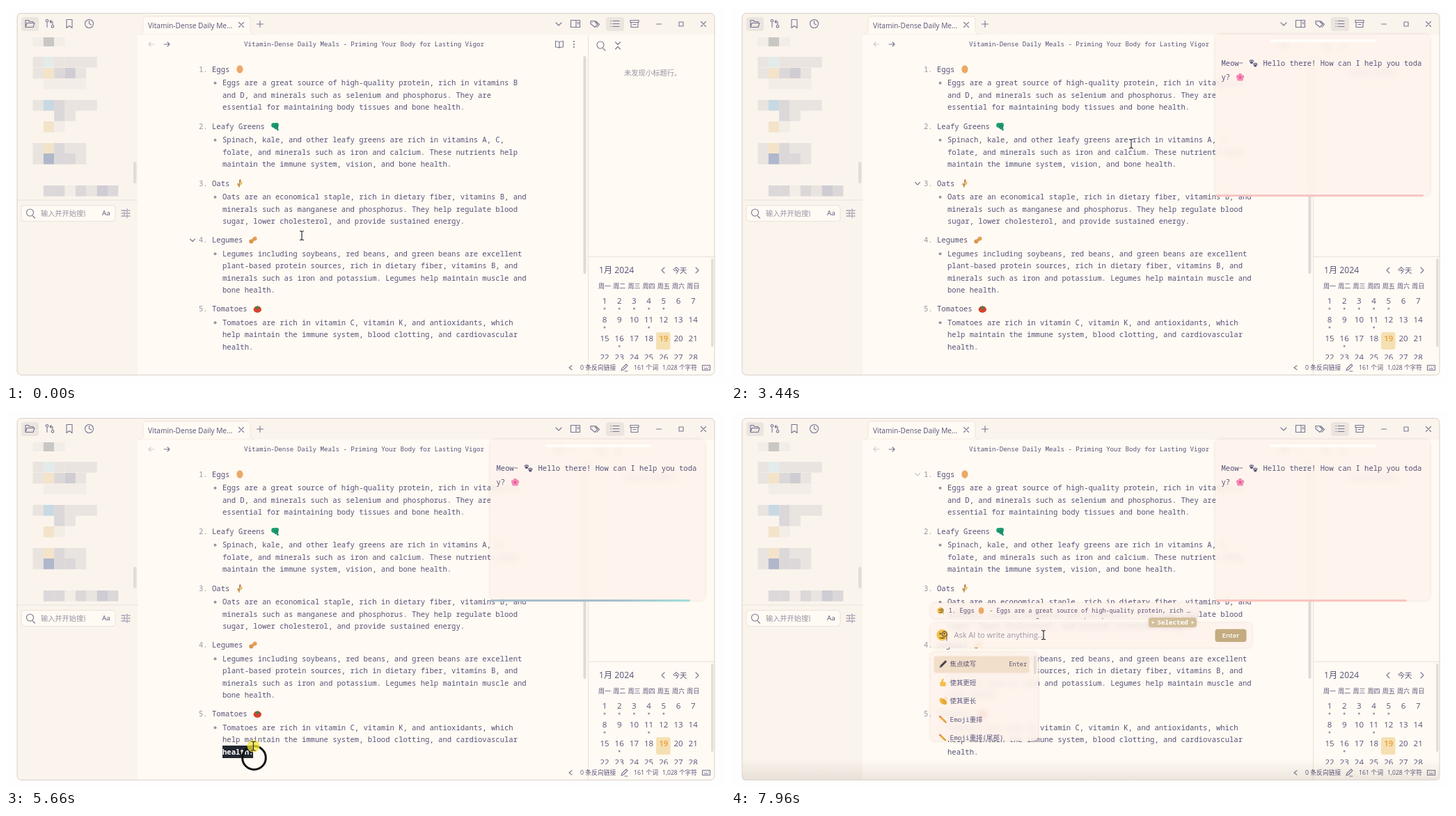
Write an HTML page that moves like this. It is 1033 px wide and 542 px high and loops after 8 s.

```html
<!DOCTYPE html>
<html lang="en">
<head>
<meta charset="utf-8">
<style>
html, body { margin: 0; width: 100%; height: 100%; overflow: hidden; background: #fefefe; }
#stage { position: relative; width: 1033px; height: 542px; overflow: hidden; }
svg { position: absolute; left: 0; top: 0; display: block; }
text { font: 10.55px 'Noto Sans Mono', 'Noto Sans CJK SC', monospace; fill: #575279; white-space: pre; }
.ui { font-family: 'Open Sans', 'Noto Sans CJK SC', sans-serif; }
.mid { text-anchor: middle; }
.muted { fill: #9893a5; }
.white { fill: #fff; }
.lit { fill: #fff; font-weight: 600; }
.today { fill: #ea9d34; font-weight: 600; }
.icon { fill: none; stroke: #797593; stroke-width: 1.1; stroke-linecap: round; stroke-linejoin: round; }
.glass { position: absolute; overflow: hidden; border-radius: 6px; background: rgba(254, 243, 236, .8);
  backdrop-filter: blur(5px); box-shadow: 0 0 4px rgba(150, 110, 90, .2); }
#tools { background: none; backdrop-filter: none; box-shadow: none; }
#badge { background: #d3bf9b; backdrop-filter: none; border-radius: 4px; }
#bar { position: absolute; left: 696px; top: 271px; height: 3px; border-radius: 2px; }
</style>
</head>
<body>
<div id="stage"></div>
<script>
const stage = document.getElementById('stage');
const $ = id => document.getElementById(id);
const CH = 6.33, LINE = 17.35;

// ---------- drawing helpers ----------
const text = (x, y, s, cls = '', size = 10.55, id = '') =>
  `<text id="${id}" x="${x}" y="${y + size * .35}" class="${cls}" style="font-size:${size}px">${s}</text>`;
const ui = (x, y, s, size, cls = '', id = '') => text(x, y, s, 'ui ' + cls, size, id);
const rect = (x, y, w, h, fill, r = 0, more = '') =>
  `<rect x="${x}" y="${y}" width="${w}" height="${h}" rx="${r}" fill="${fill}" ${more}/>`;
const dot = (x, y, r, fill) => `<circle cx="${x}" cy="${y}" r="${r}" fill="${fill}"/>`;
const oval = (x, y, rx, ry, fill, turn = 0) =>
  `<ellipse rx="${rx}" ry="${ry}" fill="${fill}" transform="translate(${x} ${y}) rotate(${turn})"/>`;
const path = (d, fill, more = '') => `<path d="${d}" fill="${fill}" ${more}/>`;
const stroke = (d, color, w) => path(d, 'none', `stroke="${color}" stroke-width="${w}" stroke-linecap="round"`);
const icon = (x, y, d) => `<path class="icon" transform="translate(${x} ${y})" d="${d}"/>`;

const paw = (x, y, c) => oval(x, y + 1.2, 2.2, 1.8, c) +
  [-2.4, -.9, .9, 2.4].map((dx, i) => oval(x + dx, y - (i % 3 ? 2 : .9), .8, 1.1, c)).join('');
const paws = c => paw(-2.6, -2, c) + paw(2.8, 2.6, c);
const face = dot(0, 0, 5.6, '#f5bf45') + dot(-2, -1.2, .8, '#5a3c20') + dot(2, -1.2, .8, '#5a3c20');
const art = {
  egg: oval(0, 0, 4.6, 5.7, '#eca865'),
  leaf: dot(-2, -1.5, 3.4, '#1d9c70') + dot(2, -2, 3.3, '#1d9c70') + dot(1.6, 1.2, 3, '#178763') + stroke('M1 1L4 5', '#1d9c70', 2.4),
  oats: stroke('M-1 5.5Q0 0 0-5', '#7b8a4e', 1) + oval(-2, 2, 1.3, 2.6, '#d98f4a', -25) + oval(2, 0, 1.3, 2.8, '#e9c067', 25) + oval(.4, -3.4, 1.2, 2.3, '#c9794a', 10),
  nut: dot(-2.6, 2, 3, '#d9914c') + dot(2.6, -2, 3, '#e6a35c') + oval(0, 0, 3.2, 2, '#df9a53', -40),
  tomato: oval(0, .8, 5.7, 4.7, '#d5432f') + path('M-4-3L-1-2.5L0-5.5L1-2.5L4-3L1.5-1L0 1L-1.5-1Z', '#2d8a4e'),
  paws: paws('#575279'),
  brownPaws: paws('#5a2a24'),
  flower: [0, 1, 2, 3, 4].map(i => dot(3.2 * Math.sin(i * 1.257), -3.2 * Math.cos(i * 1.257), 2.6, '#f58ab8')).join('') + dot(0, 0, 1.7, '#e0508c'),
  pen: stroke('M-3 3L4-4', '#44414f', 3.2) + stroke('M-5 5L-3 3', '#777', 1.2),
  thumb: rect(-4.5, -1, 9, 6.5, '#f3bd48', 2) + stroke('M-2 0L0-4.5', '#f3bd48', 2.8),
  clap: oval(-1, 0, 3.6, 5.4, '#f3bd48', -35) + oval(2, 1, 3.3, 4.8, '#e6a93c', -35) + stroke('M3-5L4-6M5-3L6-3.5', '#e6a93c', 1),
  pencil: stroke('M-4-4L3 3', '#eda73b', 3) + stroke('M3 3L5 5', '#b98a5a', 1.4) + dot(-4.5, -4.5, 1.4, '#e07a7a'),
  door: rect(-4, -6, 8, 12, '#9c4f36', .5) + rect(-2.4, -4.6, 4.8, 4, '#8a412b') + dot(2.3, 1, .8, '#e9c067'),
  think: face + stroke('M-2 2.2L2 1.4', '#5a3c20', .8) + stroke('M-3.4 5L1 3', '#e08e2b', 2.2),
  pin: stroke('M-1 1L-5 5', '#999', 1) + stroke('M-1.5 1.5L3-3', '#d9303e', 4) + stroke('M-4-1.5L1.5 4M1-5L5-1', '#d9303e', 2),
  chat: oval(0, -.6, 6.2, 4.8, '#a9cfe8') + path('M-4 2L-4.5 6L0 3.5Z', '#a9cfe8') + [-2.6, 0, 2.6].map(x => dot(x, -.6, .8, '#fff')).join(''),
  inbox: path('M-6 1H-3L-2 3H2L3 1H6V5.6H-6Z', '#6b6b70') + path('M-1.6-6H1.6V-2.5H4L0 1.6L-4-2.5H-1.6Z', '#2f9e62'),
  monocle: face + stroke('M-2 3H2', '#5a3c20', .9) + '<circle cx="2.2" cy="-1" r="2.4" fill="none" stroke="#555" stroke-width=".9"/>' + stroke('M4.4 0V5.5', '#666', .7),
};
const emoji = (name, x, y, s = 1) => `<g transform="translate(${x} ${y}) scale(${s})">${art[name]}</g>`;

// ---------- document ----------
const items = [
  ['Eggs', 'egg', 91, ['Eggs are a great source of high-quality protein, rich in vitamins B', 'and D, and minerals such as selenium and phosphorus. They are', 'essential for maintaining body tissues and bone health.']],
  ['Leafy Greens', 'leaf', 173, ['Spinach, kale, and other leafy greens are rich in vitamins A, C,', 'folate, and minerals such as iron and calcium. These nutrients help', 'maintain the immune system, vision, and bone health.']],
  ['Oats', 'oats', 255, ['Oats are an economical staple, rich in dietary fiber, vitamins B, and', 'minerals such as manganese and phosphorus. They help regulate blood', 'sugar, lower cholesterol, and provide sustained energy.']],
  ['Legumes', 'nut', 336.5, ['Legumes including soybeans, red beans, and green beans are excellent', 'plant-based protein sources, rich in dietary fiber, vitamins B, and', 'minerals such as iron and potassium. Legumes help maintain muscle and', 'bone health.']],
  ['Tomatoes', 'tomato', 435.5, ['Tomatoes are rich in vitamin C, vitamin K, and antioxidants, which', 'help maintain the immune system, blood clotting, and cardiovascular', 'health.']],
];
const lineY = (head, i) => head + 19.7 + LINE * i;
const rowYs = items.flatMap(([, , head, lines]) => [head, ...lines.map((_, i) => lineY(head, i))]);

// Rows from `start` on are selected; `raw` shows list markers as typed.
function documentMarkup(start, raw) {
  let row = 0, boxes = '', out = '';
  const box = (x1, x2, y1, y2) => boxes += rect(x1, y1, x2 - x1, y2 - y1, '#22272f', 0, 'shape-rendering="crispEdges"');
  const mark = (x1, x2, y) => box(x1, x2, y - 8.7, y + 8.7);
  items.forEach(([name, pic, head, lines], n) => {
    const picX = 296 + CH * (name.length + 1) + 8.3;
    const on = row >= start, whole = on && (raw || row > start);
    if (on) mark(whole ? 277 : 290, picX + 14, head);
    if (whole && n) box(263, 269, head - 18.5, head + 2);
    out += text(277, head, n + 1 + '.', whole ? 'lit' : 'muted') + text(296, head, name, on ? 'lit' : '') + emoji(pic, picX, head);
    row++;
    lines.forEach((line, i) => {
      const y = lineY(head, i), lit = row >= start, dash = lit && raw && !i;
      const x = dash ? 297 : 311, s = dash ? '- ' + line : line;
      // wrapped lines keep a space and the break, paragraph ends only the break
      const tail = row === rowYs.length - 1 ? 0 : i < lines.length - 1 ? 2 : 1;
      if (lit) {
        if (!i) mark(269, 288, y);
        mark(x, x + CH * (s.length + tail), y);
      }
      if (!i && !dash) out += dot(300.5, y, 2, '#9893a5');
      out += text(x, y, s, lit ? 'lit' : '');
      row++;
    });
  });
  return boxes + out;
}

// ---------- window ----------
const tones = { a: '#f3ede7', b: '#e9e4df', c: '#dcd8d9', d: '#cfccd3', e: '#c8d9e3', f: '#f3e3c9', g: '#e3ecea', h: '#b0b7cb', k: '#c9c7c4' };
const mosaic = [[45, 'aka'], [73, 'bgbbbb'], [89, 'bfcdb'], [104, ' aaaa'], [135, 'becbbb'], [150, '  cb'], [166, ' fa'],
  [197, 'bfcbb'], [212, 'bhccb'], [258, ' ccacbdc']]
  .map(([y, cells]) => [...cells].map((c, i) => c === ' ' ? '' : rect(38.5 + 15.35 * i, y, 15.4, y === 45 ? 13 : 15.5, tones[c])).join('')).join('');

const days = [...Array(28).keys()].map(i => {
  const d = i + 1, x = 860 + 21.2 * (i % 7), y = 424 + 27 * (i / 7 | 0), today = d === 19;
  return (today ? rect(934, 469, 20.5, 25, '#f5e0b2', 3) : '') +
    ui(x, y, d, 11.5, today ? 'mid today' : 'mid') +
    ([1, 2, 3, 4, 5, 8, 11, 16].includes(d) ? dot(x, y + 11, 1.5, '#9893a5') : '');
}).join('');

const search = 'M4 4L7 7M5-1A5 5 0 1 1-5-1A5 5 0 1 1 5-1';
const cross = 'M-3.5-3.5L3.5 3.5M3.5-3.5L-3.5 3.5';
const chrome = rect(16, 10.5, 1002, 520, '#fffaf3', 6) +
  path('M16 16Q16 10.5 22 10.5H1012Q1018 10.5 1018 16V41H189V530.5H22Q16 530.5 16 524Z', '#faf4ed') +
  path('M190 41Q197 41 197 35V20Q197 15 202 15H346Q351 15 351 20V35Q351 41 358 41Z', '#fffaf3', 'stroke="#eee5de"') +
  rect(190, 41, 828, 2, '#fffaf3') + rect(22, 16, 25, 20, '#ece5df', 4) + rect(862, 16, 26, 20, '#ece5df', 4) +
  stroke('M16 279H189M836.5 42V530M836.5 360.5H1018', '#e9e1da', 1) + mosaic +
  rect(183, 224, 4.5, 31, '#e3ddd8', 2) + rect(1013, 363, 3.5, 127, '#e3ddd8', 2) +
  icon(34, 25.5, 'M-6 4V-5H-2L0-3H5V-1M-6 5L-4-1H7L5 5Z') +
  icon(63, 25.5, 'M-4-2V5M4 2V-3H0M2-5L0-3L2-1M-4-6A1.6 1.6 0 1 0-4-2.5A1.6 1.6 0 1 0-4-6M4 2A1.6 1.6 0 1 0 4 5.5A1.6 1.6 0 1 0 4 2') +
  icon(91, 25.5, 'M-4-6H4V6L0 3L-4 6Z') + icon(119.5, 25.5, 'M6 0A6 6 0 1 1-6 0A6 6 0 1 1 6 0M0-4V0L3 1.5') +
  ui(204, 28, 'Vitamin-Dense Daily Me...', 10.2) +
  icon(338, 27, cross) + icon(365, 26, 'M-4.5 0H4.5M0-4.5V4.5') +
  icon(794, 26, 'M-4-2L0 2L4-2') + icon(818, 25.5, 'M-6.5-5H6.5V5H-6.5ZM1-5V5M3-2H5M3 0H5') +
  icon(846, 25.5, 'M-6-4H-1L4 1L0 5L-6 0ZM1-4L6.5 1L3 5M-4-2H-3.6') +
  icon(875, 25.5, 'M-3-4H6M-3 0H6M-3 4H6M-6-4H-5.5M-6 0H-5.5M-6 4H-5.5') +
  icon(903, 25.5, 'M-6-5H6V-2H-6ZM-5-2V5H5V-2M-2 1H2') +
  icon(938, 26, 'M-3.5 0H3.5') + icon(970, 26, 'M-3-3H3V3H-3Z') + icon(1002, 26, cross) +
  `<g opacity=".35">${icon(209, 55, 'M4 0H-4M-1-3L-4 0L-1 3')}</g>` + icon(231, 55, 'M-4 0H4M1-3L4 0L1 3') +
  text(514.5, 55, 'Vitamin-Dense Daily Meals - Priming Your Body for Lasting Vigor', 'mid', 9.13) +
  icon(795, 55, 'M0-3Q-2-4.5-5.5-4.5V4Q-2 4 0 5Q2 4 5.5 4V-4.5Q2-4.5 0-3V5') +
  [-4, 0, 4].map(d => dot(816, 55 + d, 1.1, '#797593')).join('') +
  icon(854, 57, search) + icon(879, 57, 'M-3.5-5L0-1.5L3.5-5M-3.5 5L0 1.5L3.5 5') +
  ui(888, 96, '未发现小标题行。', 10.3, 'muted') +
  rect(22, 286.5, 135, 23, '#fffaf3', 4, 'stroke="#eae2db"') + icon(34.5, 298, search) +
  `<svg x="50" y="288" width="64" height="20">${ui(0, 10.5, '输入并开始搜索', 10.2, 'muted')}</svg>` + ui(138, 298, 'Aa', 9.8) +
  icon(172, 298, 'M-6-4H0M4-4H6M2-6V-2M-6 0H-4M0 0H6M-2-2V2M-6 4H0M4 4H6M2 2V6') +
  ui(852, 380, '1月 2024', 12.2) + icon(944, 380, 'M2-4L-2 0L2 4') + ui(968, 380, '今天', 10.3, 'mid') + icon(993, 380, 'M-2-4L2 0L-2 4') +
  [...'一二三四五六日'].map((d, i) => ui(860 + 21.2 * i, 403, '周' + d, 9, 'mid')).join('') +
  `<svg width="1033" height="508">${days}</svg>` +
  icon(811, 520, 'M2-3L-2 0L2 3') + ui(825, 520, '0 条反向链接', 8.8) + icon(888, 520, 'M-4 4L-3 1L3-5L5-3L-1 3ZM1 5H5') +
  ui(902, 520, '161 个词', 8.8) + ui(943, 520, '1,028 个字符', 8.6) +
  icon(1006, 520, 'M-5.5-3.5H5.5V3.5H-5.5ZM-3-1H-2.5M0-1H.5M3-1H3.5M-2.5 1.5H2.5');

const layer = body => `<svg width="1033" height="542">${body}</svg>`;
const glass = (id, x, y, w, h, body) =>
  `<div class="glass" id="${id}" style="left:${x}px;top:${y}px;width:${w}px;height:${h}px"><svg width="${w}" height="${h}" viewBox="${x} ${y} ${w} ${h}">${body}</svg></div>`;

const menu = [['pen', '焦点续写'], ['thumb', '使其更短'], ['clap', '使其更长'], ['pencil', 'Emoji重排'], ['pencil', 'Emoji重排(尾部)']];
const buttons = ['door', 'think', 'pin', 'chat', 'inbox'];

stage.innerHTML =
  layer(`<defs><clipPath id="page"><rect x="190" y="71" width="646" height="440"/></clipPath>
    <linearGradient id="fall" x2="0" y2="1"><stop stop-color="#5a4632" stop-opacity="0"/><stop offset="1" stop-color="#5a4632" stop-opacity=".11"/></linearGradient></defs>` +
    chrome + `<g clip-path="url(#page)"><g id="scroll"><g id="doc"></g><path id="fold" class="icon" d="M-3.5-1.5L0 2L3.5-1.5"/>` +
    rect(362.5, 329, 1, 15, '#575279', 0, 'id="caret"') + '</g></g>' + rect(829.5, 72, 4, 313, '#e0dad7', 2, 'id="thumb"') +
    rect(16, 500, 1002, 30.5, 'url(#fall)', 0, 'id="shade"') +
    rect(16, 10.5, 1002, 520, 'none', 6, 'stroke="#d8cfc9"')) +
  glass('panel', 695.5, 41, 308.5, 230.5, rect(774, 48, 152, 4, '#fffdfa', 2) +
    text(704, 82, '', '', 10.55, 'say1') + emoji('paws', 750, 82) + text(764, 82, '', '', 10.55, 'say2') +
    text(704, 102.5, '', '', 10.55, 'say3') + emoji('flower', 731, 102.5)) +
  '<div id="bar"></div>' +
  glass('tools', 698, 242, 182, 29, buttons.map((b, i) =>
    rect(700 + 36 * i, 243.5, 32, 26, i === 1 ? '#ece3df' : '#fdf6f0', 4) + emoji(b, 716 + 36 * i, 256.5, 1.15)).join('')) +
  glass('ask', 286.5, 305, 461, 34.5, '<g id="who"></g>' + ui(320, 322, '', 11, '', 'typed') +
    rect(320, 315, 1, 14, '#575279', 0, 'id="askCaret"') + rect(695, 313.5, 45, 18.5, '#c4ab80', 4) + ui(717.5, 322.5, 'Enter', 9.6, 'mid lit')) +
  glass('role', 286.5, 276, 99, 22, emoji('paws', 300.5, 287, .8) + text(311.5, 287, 'Fox Aunt Suzu', '', 8.5)) +
  glass('quote', 286.5, 276, 385, 22, emoji('monocle', 300.5, 287, .85) + text(312, 287, '1. Eggs', '', 8.9) + emoji('egg', 359, 287, .85) +
    text(371, 287, '- Eggs are a great source of high-quality protein, rich …', '', 8.45)) +
  glass('badge', 600, 297, 69, 14, text(634.5, 304, 'Selected', 'mid lit', 9.2) + dot(606, 304, 1.6, '#fff') + dot(663, 304, 1.6, '#fff')) +
  glass('menu', 286.5, 346.5, 154.5, 127, rect(291, 352, 137, 24, '#f2dfc9', 3) + rect(434.5, 351, 3.5, 27, '#e6dcd4', 2) +
    menu.map(([p, s], i) => emoji(p, 304, 363.5 + 26.5 * i, .95) + text(314, 363.5 + 26.5 * i, s, '', 9.4)).join('') + text(399, 364, 'Enter', '', 8.5)) +
  layer(`<g id="key">${rect(483, 89, 55, 34, '#343131', 17, 'id="keyBox" opacity=".9"') + ui(510.5, 106, '', 17, 'mid white', 'keyText')}</g>
    <g id="ring"><circle cx="1" cy="17" r="16.8" fill="none" stroke="#111" stroke-width="3"/><circle r="9" fill="#f1e634" opacity=".75"/></g>
    <path id="beam" d="M-3-6.5Q0-6.5 0-5Q0-6.5 3-6.5M0-5V5M-3 6.5Q0 6.5 0 5Q0 6.5 3 6.5" fill="none" stroke="#33303c" stroke-width="1.2"/>
    <path id="hand" d="M-1.4 8V1Q0-1.2 1.4 1V5.5Q3 4.6 3.7 6Q5.3 5.4 5.8 6.8Q7.6 6.4 7.6 8.5V11Q7.2 13 6.4 14.8H-.5Q-1.8 13-4.6 9Q-4.2 6.8-1.4 8Z" fill="#fff" stroke="#222"/>`);

// ---------- motion ----------
const clamp = v => Math.max(0, Math.min(1, v));
const ramp = (t, from, to) => clamp((t - from) / (to - from));
const pulse = (t, a, b, c, d) => ramp(t, a, b) * (1 - ramp(t, c, d));
const smooth = k => k * k * (3 - 2 * k);
const linear = k => k;
function along(keys, t, ease = linear) {
  const i = keys.findIndex(k => k[0] > t);
  if (i < 1) return (i ? keys[keys.length - 1] : keys[0]).slice(1);
  const [a, b] = [keys[i - 1], keys[i]], k = ease((t - a[0]) / (b[0] - a[0]));
  return a.slice(1).map((v, j) => v + (b[j + 1] - v) * k);
}
const mousePath = [[0, 425, 330], [2720, 425, 330], [3300, 575, 198], [3600, 575, 198], [4050, 435, 334], [4300, 435, 334],
  [4700, 435, 346], [5200, 435, 346], [5500, 357, 489], [5650, 357, 489], [6190, 281, 128], [6600, 256, 90], [6870, 256, 90],
  [7250, 750, 257], [7720, 750, 257], [7940, 449, 322]];
const mouseAt = t => along(mousePath, t, t > 5650 && t < 6600 ? linear : smooth);
// time, then left and right colour of the countdown line
const barColors = [[3440, 248, 196, 196, 248, 196, 196], [4300, 236, 226, 170, 190, 222, 190], [5180, 150, 216, 216, 165, 222, 214],
  [6190, 188, 160, 190, 160, 222, 222], [6800, 225, 180, 205, 225, 180, 205], [7320, 248, 190, 194, 248, 190, 194], [8000, 250, 196, 190, 250, 196, 190]];

const show = (id, v) => { $(id).style.opacity = +v; $(id).style.visibility = v ? '' : 'hidden'; };
const move = (id, x, y) => $(id).setAttribute('transform', `translate(${x} ${y})`);
let docKey;

function draw(t) {
  const [mx, my] = mouseAt(t);

  // page
  let start = Infinity;
  if (t > 5650 && t < 7500) {
    const reach = mouseAt(t - 70)[1] - 9; // selection trails the pointer
    start = t > 6600 ? 0 : rowYs.findIndex(y => y >= reach);
  }
  const raw = t > 6850, key = start + '|' + raw;
  if (key !== docKey) $('doc').innerHTML = documentMarkup(start, raw), docKey = key;
  const scrolled = 57.5 * smooth(pulse(t, 4500, 4800, 5250, 5480));
  move('scroll', 0, -scrolled);
  move('thumb', 0, scrolled * .68);
  show('caret', t > 4100 && t < 5600 && (t - 4100) % 1060 < 530);
  const fold = t < 250 ? 3 : t > 3000 && t < 3900 ? 2 : t > 5900 && t < 6350 ? 1 : t > 6500 ? 0 : -1;
  show('fold', fold < 0 ? 0 : fold ? 1 : .4);
  if (fold >= 0) move('fold', 268, items[fold][2]);

  // prompt popup
  const first = pulse(t, 200, 400, 2720, 2840), again = ramp(t, 7500, 7660), open = Math.max(first, again);
  const word = 'hello'.slice(0, t < 2840 ? Math.max(0, Math.ceil((t - 1950) / 90)) : 0);
  show('ask', open);
  show('shade', open);
  show('menu', word ? 0 : open);
  show('role', Math.min(first, ramp(t, 1120, 1250)));
  show('quote', again);
  show('badge', again);
  $('who').innerHTML = emoji(t > 5000 ? 'monocle' : 'brownPaws', 303, 322, 1.45);
  $('typed').textContent = word || 'Ask AI to write anything...';
  $('typed').style.fill = word ? '#575279' : '#9893a5';
  $('askCaret').setAttribute('x', 320 + 5.4 * word.length);
  show('askCaret', (t + 100) % 1040 < 520 && t < 7900);

  // pressed keys
  const keyName = t < 1900 || t > 2450 ? 'Enter' : word;
  const width = keyName === 'Enter' ? 55 : 34 + 7 * word.length;
  $('keyText').textContent = keyName;
  $('keyBox').setAttribute('x', 510.5 - width / 2);
  $('keyBox').setAttribute('width', width);
  show('key', Math.max(pulse(t, 1000, 1080, 1660, 1740), pulse(t, 1950, 2000, 2800, 2900)));

  // reply
  const reply = ramp(t, 2800, 2950), typed = Math.floor(52 * ramp(t, 2950, 3380));
  const say = (id, s, from) => $(id).textContent = s.slice(0, Math.max(0, typed - from));
  show('panel', reply);
  show('bar', reply);
  say('say1', 'Meow~', 0);
  say('say2', 'Hello there! How can I help you toda', 8);
  say('say3', 'y?', 44);
  $('say1').nextElementSibling.style.opacity = +(typed > 6);
  $('say3').nextElementSibling.style.opacity = +(typed > 47);
  const c = along(barColors, t);
  $('bar').style.width = 299 - (t - 3440) * .0053 + 'px';
  $('bar').style.background = `linear-gradient(90deg, rgb(${c.slice(0, 3)}) 60%, rgb(${c.slice(3)}))`;
  show('tools', pulse(t, 7150, 7260, 7540, 7660));

  // pointer
  const hand = t > 7210 && t < 7760;
  for (const id of ['beam', 'hand', 'ring']) move(id, mx, my);
  show('beam', !hand);
  show('hand', hand);
  show('ring', t > 5600 && t < 6750);
}

function tick() {
  draw(performance.now() % 8000);
  requestAnimationFrame(tick);
}
tick();
</script>
</body>
</html>
```
